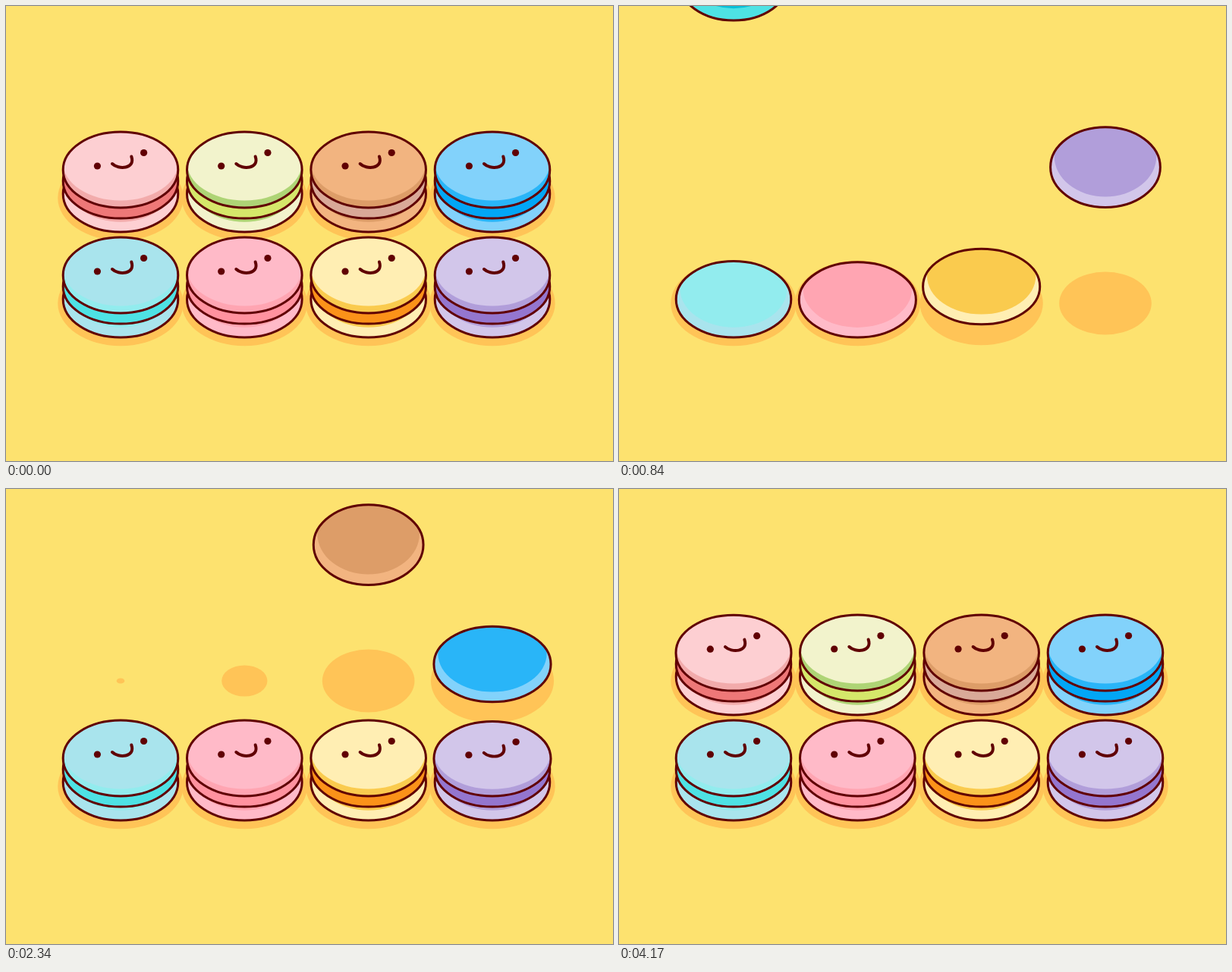
Write an HTML page with a canvas that moves like this. It is 800 by 600 pixels and loops after 4.2 s.

```html
<!DOCTYPE html>
<html lang="en">
<head>
<meta charset="utf-8">
<title>Macarons</title>
<style>
  html, body { margin: 0; width: 100%; height: 100%; overflow: hidden; background: #fde26f; }
  canvas { display: block; }
</style>
</head>
<body>
<canvas width="800" height="600"></canvas>
<script>
const ctx = document.querySelector('canvas').getContext('2d');
const LOOP = 4200, LAYER = 600, COLUMN = 150, LAND = 602, SLIDE = 926;
const INK = '#600003', SHADOW = '#ffc457', SKY = '#fde26f';

// shell, shell shade, filling, filling top
const TOP_ROW = [
  ['#fdcfd2', '#f2abab', '#ee7878', '#e55a5a'],
  ['#f2f3cc', '#aed475', '#d5e76a', '#c3dc4f'],
  ['#f2b480', '#dd9d68', '#d9a998', '#c8846e'],
  ['#82d2fb', '#29b5f8', '#02a6f6', '#0288d6']
];
const BOTTOM_ROW = [
  ['#a9e4ed', '#92ecee', '#4ee2e4', '#09bfd8'],
  ['#ffbac8', '#ffa5b2', '#ff929f', '#fc7078'],
  ['#ffeeb3', '#facb4e', '#fb9219', '#e87d22'],
  ['#d2c6ea', '#b19eda', '#9476cf', '#7d56c1']
];

// bottom edge, radius and inner ellipse of each layer
const LAYERS = [
  { foot: 437, ry: 50.3, inner: [-14, 70.5, 51] },
  { foot: 419, ry: 49, inner: [-16, 70.5, 50] },
  { foot: 405, ry: 50, inner: [-9.5, 75.8, 50] }
];

const ease = (a, b, t) => {
  const u = Math.min(1, Math.max(0, (t - a) / (b - a)));
  return u * u * (3 - 2 * u);
};

function oval(x, y, rx, ry, fill) {
  ctx.beginPath();
  ctx.ellipse(x, y, rx, ry, 0, 0, 7);
  ctx.fillStyle = fill;
  ctx.fill();
}

function face() {
  oval(-30.6, -5, 4.6, 4.6, INK);
  oval(30.6, -22.5, 4.6, 4.6, INK);
  ctx.beginPath();
  ctx.moveTo(-11, -8);
  ctx.bezierCurveTo(-3, 0, 20, -1, 14.3, -17.5);
  ctx.lineWidth = 4;
  ctx.lineCap = 'round';
  ctx.stroke();
}

function piece(x, layer, colors, t) {
  if (t < 150) return;
  const { foot, ry, inner: [dy, irx, iry] } = LAYERS[layer];
  const [shell, shade, filling, fillingTop] = colors;
  const [rim, top] = [[shell, shade], [filling, fillingTop], [shade, shell]][layer];
  // stretched in flight, squashed on landing, then settling
  const squash = ease(460, LAND, t), settle = ease(LAND, 740, t);
  const sx = 0.955 + 0.102 * squash - 0.057 * settle;
  const sy = 1.05 - 0.1 * squash + 0.05 * settle;
  const rise = 660 * (1 - ease(-30, LAND, t));

  ctx.save();
  ctx.translate(x, foot - rise - ry * sy);
  ctx.save();
  ctx.scale(sx, sy);
  oval(0, 0, 75.8, ry, rim);
  ctx.clip();
  oval(0, dy, irx, iry, top);
  ctx.restore();

  ctx.strokeStyle = INK;
  ctx.lineWidth = 3;
  ctx.beginPath();
  ctx.ellipse(0, 0, 75.8 * sx, ry * sy, 0, 0, 7);
  ctx.stroke();
  ctx.scale(sx, sy);
  if (layer === 2) face();
  ctx.restore();
}

function row(colors, t, order) {
  const columns = colors.map((c, i) => [c, 151 + i * 163.33, t - order(i) * COLUMN]);
  for (const [, x, local] of columns) {
    const k = ease(0, 590, local);
    if (k) oval(x, 392, 82.7 * k, 56.3 * k, SHADOW);
  }
  for (const [c, x, local] of columns)
    for (let layer = 0; layer < 3; layer++) piece(x, layer, c, local - layer * LAYER);
}

function tray(t, dy) {
  ctx.save();
  ctx.translate(0, dy - 139);
  row(TOP_ROW, t - 1800, i => 3 - i);
  ctx.translate(0, 139);
  row(BOTTOM_ROW, t, i => i);
  ctx.restore();
}

function draw(now) {
  const t = now % LOOP;
  ctx.fillStyle = SKY;
  ctx.fillRect(0, 0, 800, 600);
  tray(t, 0);
  // the finished tray slides away while the next one fills
  if (t < SLIDE) tray(LOOP, 600 * ease(0, SLIDE, t));
}

const start = performance.now();
function tick() {
  draw(performance.now() - start);
  requestAnimationFrame(tick);
}
tick();
</script>
</body>
</html>
```
